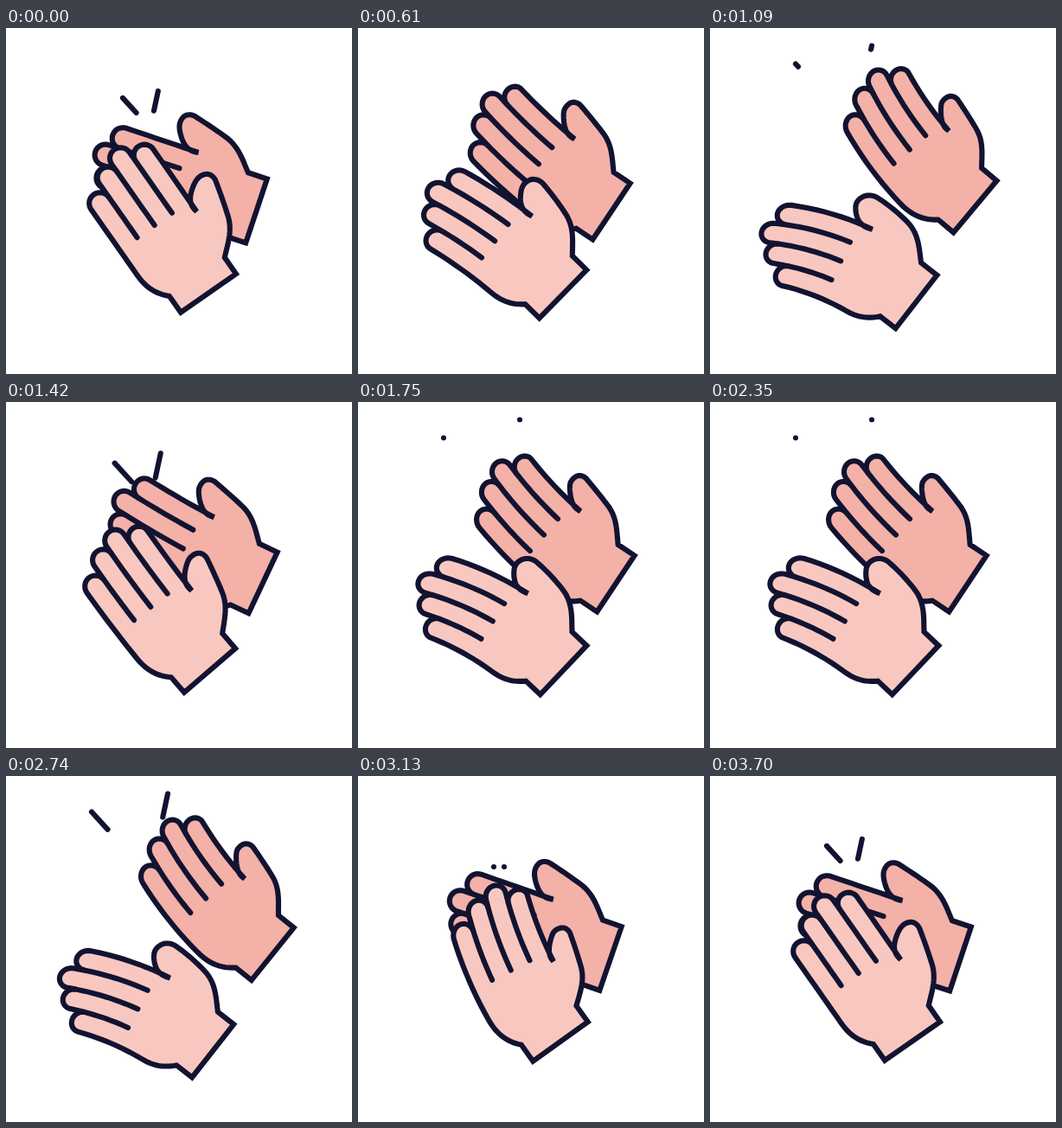
These frames come from a looping animation (400x400 px, 3760 ms). An HTML page:

```html
<!DOCTYPE html>
<html lang="en">
<head>
<meta charset="utf-8">
<title>Clapping hands</title>
<style>
html, body { margin: 0; width: 100%; height: 100%; overflow: hidden; background: #fff; }
svg { display: block; width: 100vw; height: 100vh; }
path { stroke: #121331; stroke-width: 6.1; stroke-linecap: round; stroke-miterlimit: 2; fill: none; }
</style>
</head>
<body>
<svg viewBox="0 0 400 400">
  <path id="spark"/>
  <path id="backSkin" style="fill:#f3b1a8"/>
  <path id="backLines"/>
  <path id="frontSkin" style="fill:#f8c8c0"/>
  <path id="frontLines"/>
</svg>
<script>
const LOOP = 3760, LEAD = 100, STEP = 30, BEAT = 20, LAST_HIT = 101, END = 120;
const el = id => document.getElementById(id);

// ---- Hand shape: wrist centred on the origin, fingers pointing up ----
const EDGES = [-55.5, -30.6, -6, 18.7, 43.4];
const TIPS = [-157, -176, -186, -173];

function line(x0, y0, x1, y1, n = 10) {
  return Array.from({ length: n + 1 }, (_, i) => [x0 + (x1 - x0) * i / n, y0 + (y1 - y0) * i / n]);
}
function curve(ax, ay, bx, by, cx, cy, dx, dy) {
  return Array.from({ length: 13 }, (_, i) => {
    const t = i / 12, u = 1 - t;
    const mix = (a, b, c, d) => u * u * u * a + 3 * u * u * t * b + 3 * u * t * t * c + t * t * t * d;
    return [mix(ax, bx, cx, dx), mix(ay, by, cy, dy)];
  });
}
function fingertip(i) {
  const r = (EDGES[i + 1] - EDGES[i]) / 2, cx = EDGES[i] + r;
  return Array.from({ length: 17 }, (_, j) => {
    const a = Math.PI * (1 - j / 16);
    return [cx + r * Math.cos(a), TIPS[i] - r * Math.sin(a)];
  });
}

const outline = [
  [39, 0], [-39, 0],
  ...curve(-39, -23, -50, -34, -55.5, -46, -55.5, -64),
  ...line(EDGES[0], -64, EDGES[0], TIPS[0]),
  ...TIPS.flatMap((_, i) => fingertip(i)),
  ...line(EDGES[4], TIPS[3], 43, -85),
  ...curve(43, -85, 40, -97, 46, -103, 52, -108),
  ...curve(52, -108, 60, -114, 67, -118, 75, -115),
  ...curve(75, -115, 81, -113, 83, -106, 81, -100),
  ...curve(81, -100, 78, -88, 73, -70, 69, -58),
  ...curve(69, -58, 63, -42, 50, -33, 39, -23)
];
const creases = [1, 2, 3].map(i => line(EDGES[i], Math.max(TIPS[i - 1], TIPS[i]), EDGES[i], -100));

// Curls the hand along an arc above the wrist, then places it on the stage.
// The thumb side resists being curled outwards.
function placer([x, y, deg, curl]) {
  const k = (Math.abs(curl) < 0.01 ? 0.01 : curl) / 1000;
  const c = Math.cos(deg * Math.PI / 180), s = Math.sin(deg * Math.PI / 180);
  return ([px, py]) => {
    const h = -py - 20;
    if (h > 0) {
      const a = k * h;
      const thumb = Math.max(0, Math.min(1, (px - 43) / 25));
      const give = k < 0 ? 1 - 0.75 * thumb : 1;
      py = -20 - Math.sin(a) / k - 0.75 * Math.min(px, 45) * Math.sin(a);
      px = px * Math.cos(a) - give * (1 - Math.cos(a)) / k;
    }
    return (x + px * c - py * s).toFixed(2) + ' ' + (y + px * s + py * c).toFixed(2);
  };
}
function drawHand(name, pose) {
  const put = placer(pose);
  const trace = pts => 'M' + pts.map(put).join('L');
  el(name + 'Skin').setAttribute('d', trace(outline) + 'Z');
  el(name + 'Lines').setAttribute('d', creases.map(trace).join(''));
}

// ---- Poses: x, y, angle, curl ----
const front = {
  rest: [234, 306.5, -35, 0],
  hit: [234, 307, -35.6, -2.3],
  open: [239.6, 318.7, -53.4, 3.5],
  wide: [238.5, 316.5, -52.1, 3.35],
  half: [237.5, 310, -46.5, 2.95],
  near: [237, 307.5, -45.5, 1.75]
};
const back = {
  rest: [289.5, 211.5, -71.6, 0],
  hit: [292, 211, -71, 0],
  open: [309.7, 205.3, -49.4, -2.6],
  wide: [306.5, 206.5, -50.1, -2.5],
  half: [298, 210, -56.3, -2.1],
  near: [293, 212, -56.3, -1.5]
};

function handKeys(p) {
  const keys = [[0, p.rest]];
  for (let b = 0; b < LAST_HIT - 1; b += BEAT) {
    keys.push([b + 9.5, p.open], [b + 13, p.wide], [b + 15, p.half], [b + 17, p.near], [b + 21, p.hit]);
  }
  const bounce = p.rest.map((v, i) => v + (p.near[i] - v) * 0.4);
  keys.push([109, bounce], [END, p.rest]);
  return keys;
}

// Smooth monotone interpolation through keys
function track(keys) {
  const n = keys.length;
  const slope = (i, c) => (keys[i + 1][1][c] - keys[i][1][c]) / (keys[i + 1][0] - keys[i][0]);
  const tangent = (i, c) => {
    if (i === 0 || i === n - 1) return 0;
    const a = slope(i - 1, c), b = slope(i, c);
    return a * b <= 0 ? 0 : 2 * a * b / (a + b);
  };
  return t => {
    let i = 0;
    while (i < n - 2 && t >= keys[i + 1][0]) i++;
    const [t0, v0] = keys[i], [t1, v1] = keys[i + 1];
    const d = t1 - t0, u = (t - t0) / d, w = 1 - u;
    return v0.map((v, c) => v * w * w * (1 + 2 * u) + v1[c] * u * u * (3 - 2 * u)
      + d * (tangent(i, c) * u * w * w - tangent(i + 1, c) * u * u * w));
  };
}
const frontAt = track(handKeys(front)), backAt = track(handKeys(back));

// ---- Sparks: tail and head as fractions of each ray ----
const RAYS = [[157, 105, 99, 41.5], [169, 105, 187, 20.5]];
const SPARK_REST = [0.11, 0.38];
const firstSpark = track([[0, SPARK_REST], [8, [0.7, 1]], [13, [0.95, 1]], [15, [1, 1]]]);
const beatSpark = track([[1, [0, 0]], [3, [0.11, 0.38]], [8, [0.68, 1]], [13, [0.95, 1]], [15, [1, 1]]]);
const lastSpark = track([[LAST_HIT, [0, 0]], [END, SPARK_REST]]);

function sparkAt(step) {
  if (step >= LAST_HIT) return lastSpark(step);
  const p = step % BEAT;
  if (p > 15 || (p === 0 && step > 0)) return null;
  return step < BEAT ? firstSpark(p) : beatSpark(p);
}
function drawSpark(span) {
  const d = span ? RAYS.map(([x0, y0, x1, y1]) => {
    const at = f => (x0 + (x1 - x0) * f).toFixed(2) + ' ' + (y0 + (y1 - y0) * f).toFixed(2);
    return 'M' + at(span[0]) + 'L' + at(span[1]);
  }).join('') : '';
  el('spark').setAttribute('d', d);
}

function render(ms) {
  const step = Math.max(0, Math.min(END, Math.floor((ms % LOOP - LEAD) / STEP)));
  drawHand('back', backAt(step));
  drawHand('front', frontAt(step));
  drawSpark(sparkAt(step));
}

const start = performance.now();
function tick() {
  render(performance.now() - start);
  requestAnimationFrame(tick);
}
tick();
</script>
</body>
</html>
```
